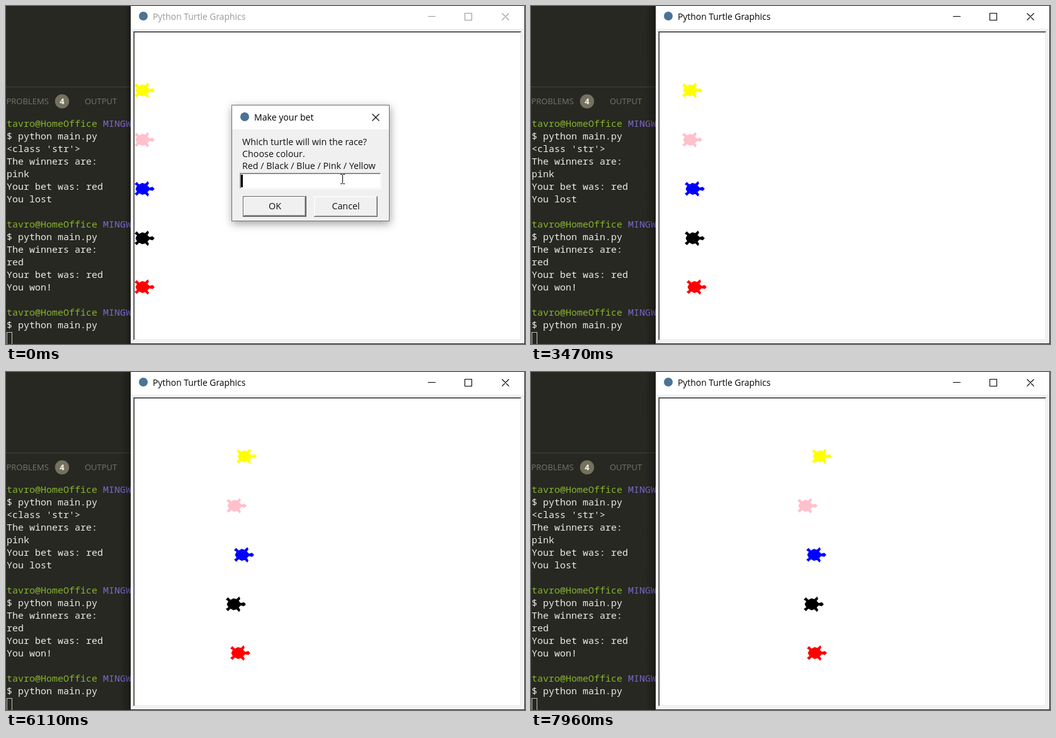
An HTML page that plays this animation: 824 px wide and 537 px high, repeating every 8000 ms.

```html
<!DOCTYPE html>
<html lang="en">
<head>
<meta charset="utf-8">
<title>Turtle race</title>
<style>
  html, body { margin: 0; width: 100%; height: 100%; overflow: hidden; background: #272822; }
  svg { display: block; width: 824px; height: 537px; }
  text { font-family: "Open Sans", "Noto Sans", sans-serif; white-space: pre; }
  .term text { font: 15px "Noto Sans Mono", "DejaVu Sans Mono", monospace; fill: #ecece6; }
  .term .user { fill: #86b42b; }
  .term .sys { fill: #7d66cc; }
  .tab { font-size: 13px; fill: #75756c; }
  .ui { font-size: 14.3px; fill: #111; }
  .shade { filter: drop-shadow(1px 4px 7px rgba(0, 0, 0, .38)); }
</style>
</head>
<body>
<svg id="stage" viewBox="0 0 824 537">
  <defs>
    <linearGradient id="edge">
      <stop offset="0" stop-color="#000" stop-opacity="0"/>
      <stop offset="1" stop-color="#000" stop-opacity=".32"/>
    </linearGradient>
  </defs>
  <rect width="824" height="537" fill="#272822"/>
  <rect y="128" width="198" height="1" fill="#43443c"/>
  <text class="tab" x="0.5" y="156">PROBLEMS</text>
  <circle cx="89" cy="151.5" r="11.2" fill="#75715e"/>
  <text x="89" y="156" font-size="13" font-weight="700" fill="#f8f8f2" text-anchor="middle">4</text>
  <text class="tab" x="125" y="156">OUTPUT</text>
  <g id="term" class="term"></g>
  <rect x="1.5" y="518.5" width="8" height="20" fill="none" stroke="#c4c4bd"/>
  <rect id="glow" y="0" height="537" fill="url(#edge)"/>

  <rect x="198" width="625" height="536" fill="#f0f0f0"/>
  <rect x="198" width="625" height="36" fill="#fff"/>
  <g id="canvas"></g>
  <circle cx="218" cy="16" r="7" fill="#4a7396"/>
  <g id="bar">
    <text x="233" y="22" font-size="13.9">Python Turtle Graphics</text>
    <path d="M670 16.5h12M728.5 11.5h11v11h-11zM787.5 11.5l11 11M798.5 11.5l-11 11" fill="none" stroke-width="1.1"/>
  </g>
  <g id="turtles"></g>

  <g id="dialog">
    <rect class="shade" x="358" y="157" width="251" height="185" fill="#707070"/>
    <rect x="359" y="158" width="249" height="183" fill="#f0f0f0"/>
    <rect x="359" y="158" width="249" height="38" fill="#fff"/>
    <circle cx="379" cy="176" r="7" fill="#4a7396"/>
    <text x="394" y="182" font-size="14.1">Make your bet</text>
    <path d="M581.5 171.5l11 11M592.5 171.5l-11 11" stroke="#000" stroke-width="1.1"/>
    <text class="ui" x="375" y="221">Which turtle will win the race?</text>
    <text class="ui" x="375" y="240">Choose colour.</text>
    <text class="ui" x="375" y="259">Red / Black / Blue / Pink / Yellow</text>
    <g id="widgets"></g>
    <text class="ui" x="427" y="323" text-anchor="middle">OK</text>
    <text class="ui" x="539.5" y="323" text-anchor="middle">Cancel</text>
    <text id="entry" class="ui" x="374" y="283" style="font-size:14px"></text>
    <rect id="caret" y="268" width="3" height="20" fill="#000"/>
    <path id="pointer" d="M531 267.5h2.5l1 1l1-1h2.5M534.5 268.5v13M531 282.5h2.5l1-1l1 1h2.5" fill="none" stroke="#000"/>
  </g>
</svg>
<script>
const LOOP = 8000, RACE = 2628, TICK = 204.6;
const $ = id => document.getElementById(id);

function add(parent, tag, attrs, text) {
  const el = document.createElementNS("http://www.w3.org/2000/svg", tag);
  for (const k in attrs) el.setAttribute(k, attrs[k]);
  if (text) el.textContent = text;
  parent.appendChild(el);
  return el;
}

// Two-pixel relief: outer and inner colours for top-left, then bottom-right
function bevel(parent, x, y, w, h, fill, [tl1, tl2, br1, br2]) {
  const box = (d, color) =>
    add(parent, "rect", { x: x + d[0], y: y + d[1], width: w - d[2], height: h - d[3], fill: color });
  box([0, 0, 0, 0], br1);
  box([0, 0, 1, 1], tl1);
  box([1, 1, 2, 2], br2);
  box([1, 1, 3, 3], tl2);
  box([2, 2, 4, 4], fill);
}

bevel($("canvas"), 202, 40, 617, 492, "#fff", ["#8a8a8a", "#303030", "#fff", "#dcdcdc"]);

const w = $("widgets");
bevel(w, 371, 265, 225, 26, "#fff", ["#a0a0a0", "#7c7c7c", "#fff", "#f0f0f0"]);
add(w, "rect", { x: 376, y: 302, width: 101, height: 33, fill: "#646464" });
const raised = ["#fff", "#f6f6f6", "#696969", "#a0a0a0"];
bevel(w, 377, 303, 99, 31, "#f0f0f0", raised);
bevel(w, 489, 302, 101, 33, "#f0f0f0", raised);

const PROMPT = "#", RUN = "$ python main.py";
const lines = [
  PROMPT, RUN, "<class 'str'>", "The winners are:", "pink", "Your bet was: red", "You lost", "",
  PROMPT, RUN, "The winners are:", "red", "Your bet was: red", "You won!", "",
  PROMPT, RUN
];
lines.forEach((line, i) => {
  const y = 192 + 20 * i;
  if (line === PROMPT) {
    add($("term"), "text", { x: 1, y, class: "user" }, "tavro@HomeOffice");
    add($("term"), "text", { x: 154, y, class: "sys" }, "MINGW64");
  } else if (line) add($("term"), "text", { x: 1, y }, line);
});

// Right half of the turtle outline as (along, across); mirrored for the other side
const half = [[16, 0], [14, 2], [10, 1], [7, 4], [9, 7], [8, 9], [5, 6], [1, 7],
  [-3, 5], [-6, 8], [-8, 6], [-5, 4], [-7, 0]];
const outline = half.concat(half.slice(1, -1).reverse().map(([a, b]) => [a, -b]))
  .map(([a, b]) => a * 1.25 + "," + b * 1.25).join(" ");

// Distance run by each turtle at the given ticks
const knots = [0, 1, 8, 11, 17, 23, 26];
const racers = [
  ["#ffff00", 134, [2, 8, 73, 102, 162, 226, 242]],
  ["#ffc0cb", 212.5, [1, 6, 76, 99, 146, 191, 219]],
  ["#0000ff", 290.5, [3, 12, 78, 103, 158, 204, 233]],
  ["#000000", 369, [4, 15, 73, 93, 145, 201, 229]],
  ["#ff0000", 446.5, [6, 17, 77, 101, 152, 204, 234]]
].map(([color, y, run]) => ({
  y, run,
  el: add($("turtles"), "polygon", { points: outline, fill: color, stroke: color, "stroke-width": 1.25 })
}));

function distance(run, k) {
  if (k < 0) return 0;
  let i = 0;
  while (i < knots.length - 2 && k > knots[i + 1]) i++;
  const f = (k - knots[i]) / (knots[i + 1] - knots[i]);
  return Math.round(run[i] + f * (run[i + 1] - run[i]));
}

const show = (el, on) => el.setAttribute("visibility", on ? "inherit" : "hidden");
const typed = t => "red".slice(0, [800, 1010, 1220].filter(s => t >= s).length);
const caretOn = t => t < 420 || (t >= 800 && t < 1430) || (t >= 1640 && t < 2250);

function draw(t) {
  const tick = Math.floor((t - RACE) / TICK), racing = tick >= 0;
  for (const r of racers)
    r.el.setAttribute("transform", `translate(${215 + distance(r.run, tick)} ${r.y})`);

  const ink = racing ? "#000" : "#999";
  $("bar").setAttribute("fill", ink);
  $("bar").setAttribute("stroke", "none");
  $("bar").lastElementChild.setAttribute("stroke", ink);
  const spread = racing ? 17 : 9;
  $("glow").setAttribute("x", 198 - spread);
  $("glow").setAttribute("width", spread);

  show($("dialog"), !racing);
  const word = typed(t);
  $("entry").textContent = word;
  $("caret").setAttribute("x", [373, 379, 386, 394][word.length]);
  show($("caret"), !racing && caretOn(t));
  show($("pointer"), !racing && t < 200);
}

const start = performance.now();
function frame() {
  draw((performance.now() - start) % LOOP);
  requestAnimationFrame(frame);
}
draw(0);
requestAnimationFrame(frame);
</script>
</body>
</html>
```
